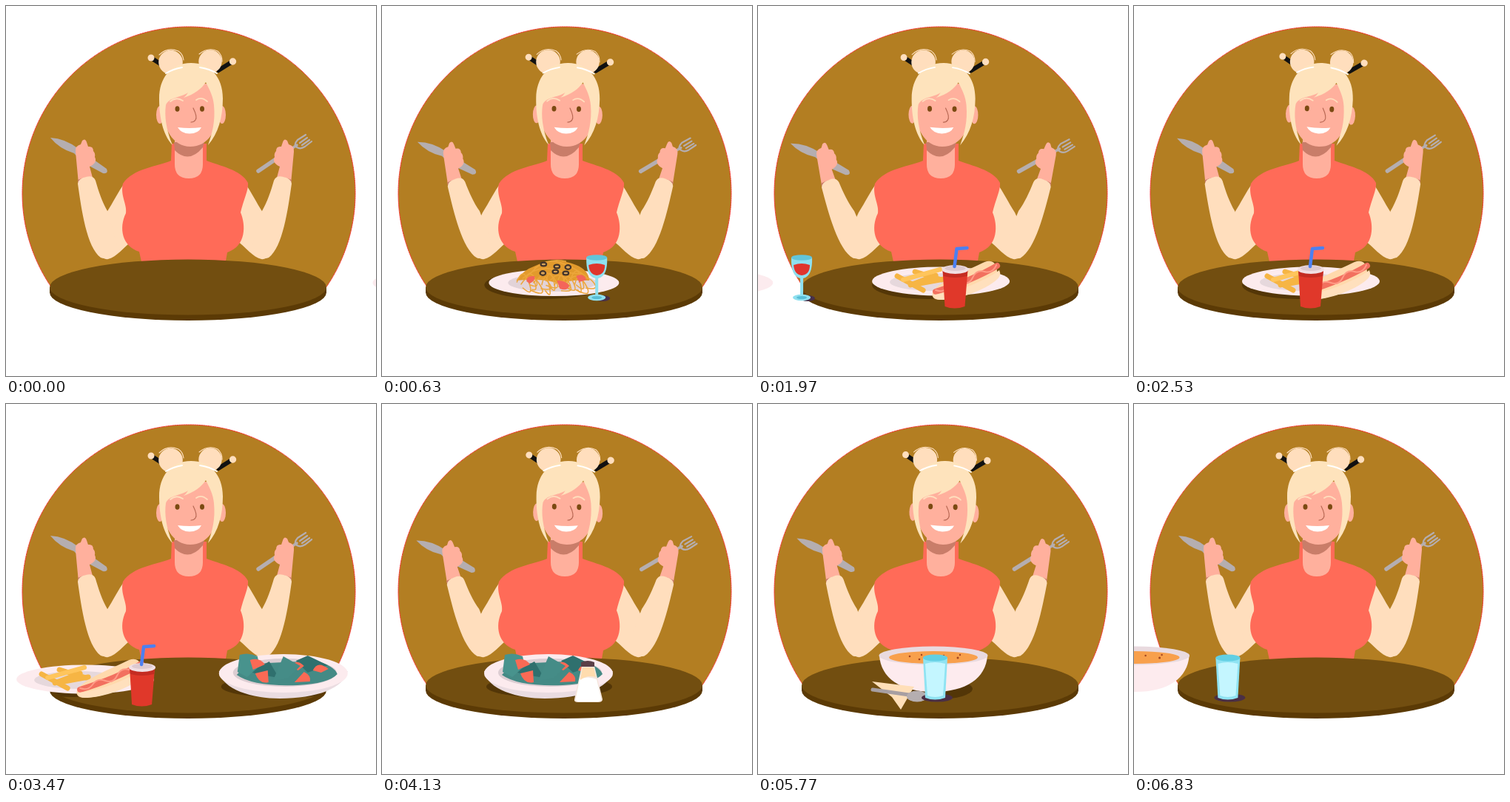
These frames come from a looping animation (500 px wide and 500 px high, 6860 ms). An HTML page:

```html
<!DOCTYPE html>
<html lang="en">
<head>
<meta charset="utf-8">
<title>Dinner table</title>
<style>
html, body { margin: 0; width: 100%; height: 100%; overflow: hidden; background: #fff; }
svg { display: block; width: 100vw; height: 100vh; }
.skin { fill: #ffb09d; }
.shade { fill: #c97d69; }
.hair { fill: #ffdebd; }
.metal { fill: #b5aeb0; }
.china { fill: #fcebee; }
.line { fill: none; stroke-linecap: round; stroke-linejoin: round; }
</style>
</head>
<body>
<svg viewBox="0 0 500 500">
  <defs>
    <clipPath id="room"><rect width="500" height="382"/></clipPath>
    <clipPath id="top"><ellipse cx="246" cy="380" rx="187" ry="38"/></clipPath>
    <g id="sleeve">
      <path class="hair" d="M161 238C151 252 145 265 136 279L118 318Q127 344 138 342C150 339 158 327 172 316Z"/>
    </g>
    <g id="forearm">
      <path class="hair" d="M97 240C102 275 109 326 128 340Q142 345 150 322L137 277C130 265 125 250 121 236Q118 228 108 231Q98 233 97 240Z"/>
    </g>
    <g id="hand">
      <path class="skin" d="M98 240L94 197Q93 189 101 187L103 182Q107 178 109 184L111 190Q118 189 118 196Q121 199 120 204Q124 212 113 217L117 232Q106 234 98 240Z"/>
      <path class="shade" d="M97 235Q106 231 114 231L117 233Q105 234 98 241Z"/>
    </g>
  </defs>

  <g clip-path="url(#room)">
    <circle cx="247" cy="253" r="225" fill="#b37e22"/>
    <circle cx="247" cy="253" r="225" class="line" stroke="#f5302c" stroke-width="1" stroke-linecap="butt" stroke-dasharray="2 1"/>
  </g>

  <g>
    <use href="#sleeve"/>
    <g id="armL">
      <g id="handL">
        <path class="metal" d="M60 178Q80 179 98 193L136 220Q139 227 131 226L103 211L92 199Q72 193 60 178Z"/>
        <use href="#hand"/>
      </g>
      <use href="#forearm"/>
    </g>
  </g>
  <g transform="translate(483) scale(-1 1)">
    <use href="#sleeve"/>
    <g id="armR">
      <g id="handR">
        <path class="line" d="M142 223L117 206" stroke="#b5aeb0" stroke-width="5.500"/>
        <path class="line" d="M117 206L90 188" stroke="#b5aeb0" stroke-width="3.500"/>
        <path class="line" d="M78 174L89 181Q95 188 90 191Q85 194 79 190L70 183M76 178L86 185M73 181L83 188" stroke="#b5aeb0" stroke-width="2.200"/>
        <use href="#hand"/>
      </g>
      <use href="#forearm"/>
    </g>
  </g>

  <path fill="#ff6b58" d="M224 186L223 209C205 217 172 219 158 240C154 256 164 268 162 280C152 300 157 325 180 332L184 350H296L299 333C325 324 324 296 317 279C321 262 328 248 327 239C318 221 288 216 271 209V186Z"/>
  <path fill="#ffb09d" d="M228 175V214Q228 233 247 233Q266 233 266 214V175Z"/>
  <path class="shade" d="M227 184H268L266 191Q247 214 228 195Z"/>

  <g id="head">
    <path class="line" d="M199 72L213 81M287 87L303 77" stroke="#111" stroke-width="6" stroke-linecap="butt"/>
    <g class="hair">
      <circle cx="196" cy="70" r="4.500"/><circle cx="306.500" cy="75" r="4.700"/>
      <circle cx="222.500" cy="76" r="16.300"/><circle cx="276" cy="75" r="15.700"/>
    </g>
    <path class="line" d="M207 66Q218 55 233 61Q239 65 240 73M261 65Q273 55 286 61Q292 66 292 75" stroke="#ffdebd" stroke-width="1.100"/>
    <ellipse class="skin" cx="208" cy="147" rx="5" ry="12"/>
    <ellipse class="skin" cx="292" cy="147" rx="5" ry="12"/>
    <path class="skin" d="M212 105H287V140C286 168 273 190 249 190C225 190 212 164 212 140Z"/>
    <g id="face">
      <path class="line" d="M222 129Q230 122 239 128M257 127Q264 122 272 129" stroke="#ffdebd" stroke-width="1.800"/>
      <g fill="#7b4a12"><ellipse cx="231.500" cy="139" rx="3" ry="3.800"/><ellipse cx="265" cy="139" rx="3" ry="3.800"/></g>
    </g>
    <path id="nose" class="line" d="M253 138Q259 150 256 154Q254 157 250 157" stroke="#b76753" stroke-width="1.200"/>
    <path fill="#fff" d="M232 164Q248 166 264 164Q260 172.500 248 172.500Q237 172.500 232 164Z"/>
    <path fill="#fee3bc" d="M250 77C222 77 207 98 207 125C207 150 212 174 225 188C216 166 214 148 216 134C220 123 236 124 246 117Q244 121 240 124C255 119 264 112 270 103C275 113 280 122 281 134C283 156 279 171 273 188C287 172 293 150 293 125C293 95 275 77 250 77Z"/>
    <path class="line" d="M216 91Q226 85 238 83M262 83Q275 85 285 91" stroke="#fff" stroke-width="1.900"/>
  </g>

  <ellipse cx="246" cy="387" rx="187" ry="38" fill="#5b3a05"/>
  <path fill="#5b3a05" d="M59 380H433V388H59Z"/>
  <ellipse cx="246" cy="380" rx="187" ry="37.500" fill="#724e10"/>

  <g clip-path="url(#top)" fill="#533607">
    <ellipse class="pasta" cx="218" cy="377" rx="80" ry="19"/>
    <ellipse class="dog" cx="222" cy="377" rx="76" ry="19"/>
    <ellipse class="salad" cx="226" cy="382" rx="85" ry="15"/>
    <ellipse class="soup" cx="242" cy="385" rx="48" ry="14"/>
  </g>

  <g class="pasta">
    <ellipse class="china" cx="232" cy="374" rx="88" ry="18"/>
    <ellipse cx="230" cy="374" rx="60" ry="12" fill="#e2d3d8"/>
    <path fill="#e29a2c" d="M181 371Q190 357 207 351Q233 338 262 350Q279 357 280 371Q255 369 240 376Q220 367 181 371Z"/>
    <g id="noodles" class="line" stroke="#eda63b" stroke-width="1.500"></g>
    <g fill="#f4655a"><path d="M195 372Q194 364 206 365Q207 372 199 375Z"/><path d="M236 371Q247 370 253 378Q250 386 240 382Z"/><path d="M262 365Q272 360 276 370L266 373Z"/></g>
    <g fill="#d9a55a" stroke="#43342b" stroke-width="2.200"><ellipse cx="218" cy="349" rx="3.800" ry="2.400"/><ellipse cx="236" cy="352" rx="3.800" ry="2.400"/><ellipse cx="251" cy="353" rx="3.800" ry="2.800"/><ellipse cx="217" cy="361" rx="3.800" ry="2.800"/><ellipse cx="234" cy="359" rx="3.800" ry="2.400"/><ellipse cx="248" cy="361" rx="3.800" ry="2.400"/></g>
  </g>
  <g class="wine">
    <ellipse cx="296" cy="395" rx="10" ry="4" fill="#48304a"/>
    <path fill="#8fe0ef" d="M274 340Q273 365 286 368V390H290V368Q303 365 302 340Z"/>
    <path fill="#e0342c" d="M277 350Q288 346 299 350Q299 363 288 364Q278 363 277 350Z"/>
    <ellipse cx="288" cy="340" rx="14" ry="3.800" fill="#62c5da"/>
    <ellipse cx="288" cy="394" rx="12" ry="4.200" fill="#8fe0ef"/>
    <ellipse cx="288" cy="394" rx="7" ry="2" fill="#58bdd6"/>
  </g>

  <g class="dog">
    <ellipse class="china" cx="239" cy="372" rx="93" ry="19.500"/>
    <ellipse cx="230" cy="373" rx="60" ry="12" fill="#e6d8dc"/>
    <g class="line" stroke="#f6b544" stroke-width="7" stroke-linecap="butt">
      <path d="M180 365L215 384M204 359L240 370M198 377L232 364M210 375L243 369"/>
      <path d="M188 370L238 356" stroke="#ffc55c" stroke-width="6"/>
    </g>
    <path fill="#ffd9ac" d="M228 386C238 371 276 357 298 346Q310 342 314 352L316 366C300 382 262 397 238 397Q225 397 228 386Z"/>
    <path class="line" d="M232 386C258 378 290 366 315 351" stroke="#f2705f" stroke-width="8"/>
    <path class="line" d="M232 384Q243 388 249 379T266 374T282 367T298 359T314 350" stroke="#ff9b86" stroke-width="2"/>
    <path fill="#ffe0bd" d="M229 390C258 388 296 373 318 357Q322 365 312 372C292 387 260 397 238 397Q230 397 229 390Z"/>
  </g>
  <g class="cup">
    <path fill="#e0382a" d="M222 357H256L252 406Q238 411 225 406Z"/>
    <path fill="#c42c22" d="M222 357H256L255 365Q238 369 223 365Z"/>
    <ellipse cx="239" cy="356" rx="18" ry="6" fill="#f1dfe3"/>
    <ellipse cx="239" cy="354.500" rx="14" ry="3.500" fill="#ddc9cf"/>
    <path class="line" d="M238 352L241 328L255 327" stroke="#4c80f1" stroke-width="4.500" stroke-linecap="butt"/>
  </g>

  <g class="salad"><g transform="translate(54)">
    <path fill="#eadce1" d="M84 361C88 386 130 398 166 398C216 398 253 384 258 361Z"/>
    <ellipse cx="171" cy="364" rx="87" ry="26" class="china"/>
    <ellipse cx="173" cy="363" rx="70" ry="19" fill="#dccdd2"/>
    <path fill="#448a85" d="M108 366Q120 352 150 350L215 347Q240 354 244 365Q232 378 190 380Q130 382 108 366Z"/>
    <path fill="#2f706e" d="M126 362L152 348L165 370L140 366ZM188 347L204 340L231 353L204 363Z"/>
    <path fill="#48938d" d="M109 362L112 339Q124 335 136 341L139 354L122 369Z"/>
    <g fill="#fa6a55"><path d="M126 346Q139 342 146 352L130 359Z"/><path d="M133 364L150 360L151 376Q138 379 133 364Z"/><path d="M181 355Q188 343 199 354L191 360Z"/><path d="M186 376L199 362Q209 367 207 375Z"/><path d="M211 360Q217 346 232 358L222 363Z"/></g>
    <path fill="#458c87" d="M171 341L194 354L178 370L157 374Z"/>
  </g></g>
  <g class="shaker">
    <path fill="#f5e6dc" d="M270 354H287L298 399Q298 403 292 403H265Q259 403 260 399Z"/>
    <path fill="#fff" d="M267 372Q278 367 290 372L296 398Q296 402 291 402H266Q261 402 262 398Z"/>
    <path fill="#ffdcae" d="M271 356H286L289 369Q277 366 268 373Z"/>
    <path fill="#5b4048" d="M269 349Q278 345 287 349V355H269Z"/>
  </g>

  <g class="soup">
    <path fill="#fdebee" d="M164 340C166 370 192 389 237 389C282 389 308 370 310 340Z"/>
    <ellipse cx="237" cy="340" rx="73.500" ry="12.500" fill="#e9dadf"/>
    <ellipse cx="237" cy="342.500" rx="60" ry="8.500" fill="#f8a04c"/>
    <g fill="#a34420"><circle cx="205" cy="341" r="1.300"/><circle cx="218" cy="345" r="1.300"/><circle cx="221" cy="339" r="1.200"/><circle cx="251" cy="340" r="1.200"/><circle cx="270" cy="343" r="1.500"/><circle cx="273" cy="339" r="1.200"/></g>
    <path fill="#ffdfb8" d="M154 375L211 382L193 413L181 396Z"/>
    <path class="line" d="M155 386L204 393" stroke="#a79fa2" stroke-width="5"/>
    <ellipse cx="215" cy="395" rx="14" ry="7.500" class="metal"/>
  </g>
  <g class="water">
    <ellipse cx="242" cy="397" rx="21" ry="5.500" fill="#4a2f45"/>
    <path fill="#8fe3f2" d="M223 343H256L253 397Q239 402 226 397Z"/>
    <path fill="#c4f6ff" d="M226 351Q239 347 253 351L250 394Q239 398 229 394Z"/>
    <ellipse cx="239.500" cy="343" rx="16.500" ry="4.500" fill="#62cfe3"/>
  </g>
</svg>
<script>
const LOOP = 6860;
const $ = id => document.getElementById(id);
const clamp = u => Math.min(1, Math.max(0, u));
const smooth = u => (1 - Math.cos(Math.PI * clamp(u))) / 2;

// [name, enters at, leaves at]
const dishes = [
  ['pasta', 0, 1470], ['wine', 60, 1620],
  ['dog', 1470, 3280], ['cup', 1570, 3393],
  ['salad', 3297, 4897], ['shaker', 3430, 5050],
  ['soup', 4897, 6468], ['water', 5050, 6669]
].map(([name, enter, leave]) => ({ enter, leave, parts: document.querySelectorAll('.' + name) }));

const turns = [[0, 0], [500, 1.2], [1430, -4.7], [1560, -5.1], [2200, 2.7], [2530, 2.1], [2800, 0],
  [3430, 0], [4150, 1.2], [4900, -.8], [5250, -5], [5900, 2.2], [6330, 1], [6750, 0], [LOOP, 0]];
const looks = [[0, 0], [800, 0], [1350, 6], [1560, 6], [2000, 0], [2850, 0], [3120, -3], [3400, 0],
  [4980, 0], [5250, 5], [5600, 0], [LOOP, 0]];

function along(keys, t) {
  const i = Math.max(1, keys.findIndex(k => k[0] >= t));
  const [a, x] = keys[i - 1], [b, y] = keys[i];
  return x + (y - x) * smooth((t - a) / (b - a));
}

function slide(t, enter, leave) {
  if (t < enter) return 600;
  return 353 * (1 - clamp((t - enter) / 700)) ** 3
    - 360 * Math.sin(clamp((t - leave) / 800) * Math.PI / 2);
}

function move(el, value) { el.setAttribute('transform', value); }

function swing(side, arm, hand) {
  move($('arm' + side), `rotate(${-arm} 135 335)`);
  move($('hand' + side), `rotate(${hand} 106 228)`);
}

function draw(t) {
  const half = t % (LOOP / 2);
  const open = smooth(half / 950) - smooth((half - 1950) / 750);
  swing('L', 6.8 * open, 2.5 * open);
  swing('R', 6 * open, open);
  const look = along(looks, t);
  move($('head'), `rotate(${along(turns, t)} 250 202)`);
  move($('face'), `translate(0 ${look})`);
  move($('nose'), `translate(0 ${look * .4})`);
  for (const { parts, enter, leave } of dishes) {
    const x = slide(t, enter, leave);
    parts.forEach(p => move(p, `translate(${x.toFixed(2)})`));
  }
}

// Loose strands around the mound
let strands = '';
for (let i = 0; i < 16; i++) {
  const x = 182 + i * 5.6, y = 373 + 4 * Math.sin(i * 2.3), w = 16 + 9 * Math.sin(i * 1.7);
  strands += `<path d="M${x} ${y}q${w / 2} ${-16 - 6 * Math.cos(i)} ${w} 0t${-w / 2} 8"/>`;
}
$('noodles').innerHTML = strands + '<path d="M200 362Q218 340 238 346T276 366M206 354Q225 340 248 345M190 368Q210 350 232 356T270 362"/>';

const start = performance.now();
function frame() {
  draw((performance.now() - start) % LOOP);
  requestAnimationFrame(frame);
}
frame();
</script>
</body>
</html>
```
